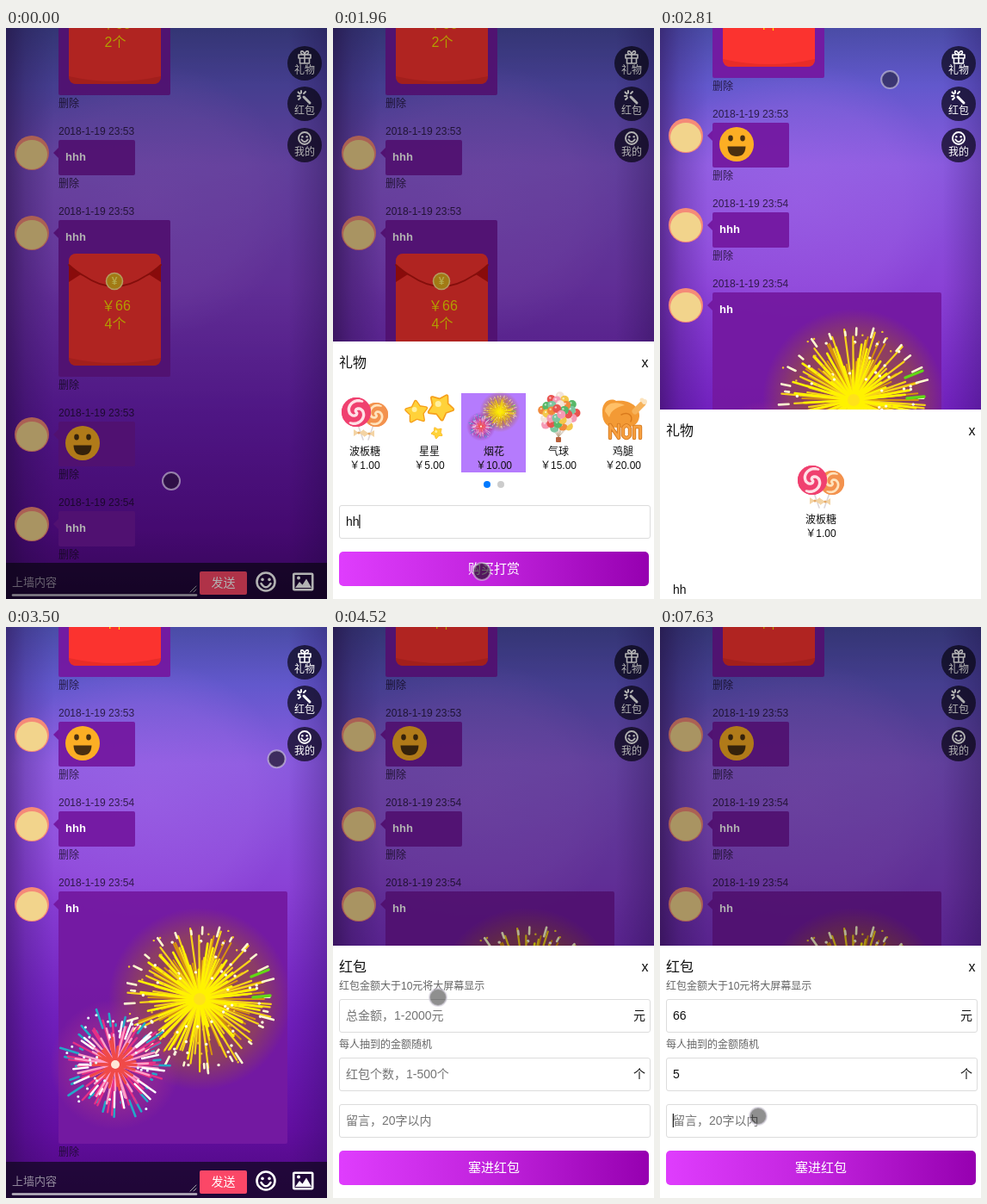
Animation, 373 px wide and 663 px high, one loop 8 s. Source, as an HTML page:

```html
<!DOCTYPE html>
<html lang="zh-CN">
<head>
<meta charset="utf-8">
<title>礼物与红包</title>
<style>
html, body { margin: 0; width: 100%; height: 100%; overflow: hidden; background: #4c087c; }
svg { display: block; width: 100vw; height: 100vh; }
text { font-family: "Liberation Sans", "Noto Sans CJK SC", "Noto Sans CJK", sans-serif; white-space: pre; }
</style>
</head>
<body>
<svg id="stage" viewBox="0 0 373 663" preserveAspectRatio="none"></svg>
<script>
const LOOP = 8000;
const DIGIT = 7.786; // advance of one 14px character

let seed = 7;
const rnd = () => {
  seed = (seed * 16807) % 2147483647;
  return seed / 2147483647;
};
const range = n => [...Array(n).keys()];
const polar = (x, y, r, a) => `${(x + r * Math.cos(a)).toFixed(1)} ${(y + r * Math.sin(a)).toFixed(1)}`;

// y is the vertical middle of the line
const label = (x, y, size, fill, str, extra = '') =>
  `<text x="${x}" y="${y + size * 0.36}" font-size="${size}" fill="${fill}" ${extra}>${str}</text>`;
const middle = 'text-anchor="middle"';
const circle = (x, y, r, fill, extra = '') => `<circle cx="${x}" cy="${y}" r="${r}" fill="${fill}" ${extra}/>`;
const rect = (x, y, w, h, fill, rx = 0, extra = '') =>
  `<rect x="${x}" y="${y}" width="${w}" height="${h}" rx="${rx}" fill="${fill}" ${extra}/>`;
const path = (d, fill, extra = '') => `<path d="${d}" fill="${fill}" ${extra}/>`;
const line = (d, color, width, extra = '') =>
  path(d, 'none', `stroke="${color}" stroke-width="${width}" stroke-linecap="round" stroke-linejoin="round" ${extra}`);
const group = (inner, x = 0, y = 0, extra = '') => `<g transform="translate(${x} ${y})" ${extra}>${inner}</g>`;

/* ---------- gifts, drawn in a 56px box ---------- */
function swirl(x, y, r, color, pale) {
  const arm = turn => range(24).map(i => (i ? 'L' : 'M') + polar(x, y, r * 0.86 * i / 23, turn + i * 0.2)).join('');
  return circle(x, y, r, color) + line(arm(0.6) + arm(0.6 + Math.PI), pale, r * 0.2) +
    circle(x, y, r - 0.8, 'none', `stroke="${color}" stroke-width="1.6"`);
}

function lollipop() {
  const bow = (x, y) => path(`M${x} ${y}l-6 -4v8zl6 -4v8z`, '#f3d3a4') + circle(x, y, 1.6, '#e6aa68');
  return line('M20 36L26 53M38 36L32 53', '#ddd6d8', 1.6) + swirl(41, 24, 14, '#f3924e', '#ffe3bd') +
    swirl(18, 21, 17, '#f0406f', '#ffe0e6') + bow(21, 45) + bow(33, 46);
}

function star(x, y, r, turn) {
  const d = range(10).map(i => (i ? 'L' : 'M') + polar(x, y, i % 2 ? r * 0.56 : r, turn + i * Math.PI / 5)).join('') + 'Z';
  return path(d, '#ffc52c', `stroke="#f6a01c" stroke-width="${r * 0.35}" stroke-linejoin="round"`) +
    path(d, '#ffd23a', 'stroke="#ffd23a" stroke-width="1.5" stroke-linejoin="round"') +
    circle(x - r * 0.2, y - r * 0.25, r * 0.25, '#fff0a0');
}
const stars = () => star(41, 15, 14, 0.2) + star(13, 21, 12, -0.4) + star(37, 45, 6, 0.5);

function balloons() {
  const colors = ['#e8534f', '#58b868', '#f4c84c', '#f59ab5', '#7cc6a0', '#f08a3c', '#f3e3d8'];
  const spots = range(30).map(i => {
    const r = 20.5 * Math.sqrt((30 - i) / 30), a = i * 2.4;
    return [28 + r * Math.cos(a), 22 + r * Math.sin(a)];
  });
  return line(spots.filter((p, i) => i % 3 == 0).map(([x, y]) => `M${x.toFixed(1)} ${y.toFixed(1)}L28 50`).join(''), '#b9a58a', 0.6) +
    spots.map(([x, y], i) => circle(x.toFixed(1), y.toFixed(1), 5, colors[i * 3 % 7]) +
      circle((x - 1.4).toFixed(1), (y - 1.6).toFixed(1), 1.2, '#fff', 'opacity=".6"')).join('') +
    rect(25, 50, 6, 6, '#b8603c', 1);
}

function roast() {
  const letters = 'M13 51V36L23 51V36M28 40Q32 33 36 40V48Q32 54 28 48ZM41 51V38H48V51';
  return path('M4 22C3 8 14 4 20 8C34 6 48 14 47 26C46 38 34 40 24 39C10 40 4 34 4 22Z', '#f39a35') +
    path('M7 20C8 10 20 8 30 13C22 15 14 18 12 27Z', '#ffc067') +
    line('M42 20L51 11', '#f6b25a', 7) + circle(53, 9, 3, '#fbe3bd') + circle(50, 7, 2.5, '#fbe3bd') +
    line('M26 24C34 20 40 25 37 32', '#d97a1c', 1.5) +
    line(letters, '#d0741c', 4.4) + line(letters, '#f7a040', 2.8);
}

// drawn in a 250px box; rays run from a share of r to a random share up to 1
function burst(x, y, r, n, from, color, width, least = 0.6) {
  const d = range(n).map(i => {
    const a = (i + rnd()) * 2 * Math.PI / n, far = r * (least + (1 - least) * rnd());
    return `M${polar(x, y, r * from, a)}L${polar(x, y, far, a)}`;
  }).join('');
  return line(d, color, width);
}
function sparks(x, y, r, n, color, size) {
  const d = range(n).map(() => `M${polar(x, y, r * (0.35 + 0.65 * rnd()), rnd() * 2 * Math.PI)}l.1 0`).join('');
  return line(d, color, size);
}
function fireworks() {
  const [x, y, u, v] = [156, 92, 58, 168];
  return circle(x, y, 106, 'url(#warm)') + circle(u, v, 76, 'url(#rosy)') +
    burst(x, y, 78, 60, 0.08, '#d8920c', 2, 0.5) + burst(x, y, 86, 56, 0.08, '#f6d21a', 2.2, 0.55) +
    burst(x, y, 74, 40, 0.05, '#fff200', 2.6, 0.4) + burst(x, y, 90, 30, 0.84, '#fffbd0', 2.6, 0.88) +
    sparks(x, y, 80, 46, '#fffbe0', 3.4) + sparks(x, y, 94, 30, '#f4c52a', 2.4) +
    line(`M${x + 60} ${y - 26}l20 -8M${x + 62} ${y - 2}l20 -2`, '#62d815', 3.4) + circle(x, y, 7, '#ffe21a') +
    burst(u, v, 68, 34, 0.66, '#24a8c8', 2.6) + burst(u, v, 60, 38, 0.3, '#e62f86', 2.4) +
    burst(u, v, 50, 30, 0.15, '#ff9fc8', 2.4) + burst(u, v, 58, 18, 0.55, '#ffffff', 2.4) +
    burst(u, v, 32, 26, 0.1, '#f04a48', 3) + sparks(u, v, 64, 30, '#e8fbff', 3) + circle(u, v, 5, '#ffe6d8');
}

const gifts = [
  ['波板糖', '1.00', lollipop()],
  ['星星', '5.00', stars()],
  ['烟花', '10.00', '<use href="#fireworks" transform="scale(.224)"/>'],
  ['气球', '15.00', balloons()],
  ['鸡腿', '20.00', roast()]
];
const gift = ([name, price, art], x) => group(art, x - 28, 425) +
  label(x, 492, 12, '#111', name, middle) + label(x, 508, 12, '#111', '￥' + price, middle);

/* ---------- chat ---------- */
function envelope(count) {
  return rect(0, 0, 107, 130, '#fb332f', 9) +
    path('M0 121Q53 133 107 121Q107 130 98 130H9Q0 130 0 121Z', '#e82c28') +
    path('M0 12L14 24L0 33ZM107 12L93 24L107 33Z', '#c41010') +
    path('M0 13Q10 22 18 26Q53 50 89 26Q97 22 107 13V9Q107 0 98 0H9Q0 0 0 9Z', '#fb332f') +
    line('M0 13Q10 22 18 26Q53 50 89 26Q97 22 107 13', '#bd1410', 1.8) +
    circle(53, 32, 9.5, '#e8ae1c', 'stroke="#ffe08a" stroke-width="1.6"') +
    label(53, 32, 12, '#fff06a', '¥', middle + ' font-weight="bold"') +
    label(55, 60, 16, '#ffe100', '￥66', middle) + label(54, 81, 16, '#ffe100', count + '个', middle);
}
const emoji = circle(28, 25, 20, '#fcae24') +
  '<ellipse cx="21" cy="18" rx="2.8" ry="3.4" fill="#4a3010"/><ellipse cx="35" cy="18" rx="2.8" ry="3.4" fill="#4a3010"/>' +
  path('M17.5 27.5H38.5Q38 39 28 39Q18 39 17.5 27.5Z', '#4a3010');

function message(top, w, h, minute, text, inner = '') {
  const ink = 'rgba(22,10,36,.78)';
  return label(61, top - 10, 12, ink, '2018-1-19 23:' + minute) +
    rect(61, top, w, h, '#7419a2', 2, 'opacity=".96"') + path(`M55 ${top + 15}l6 -6v12z`, '#7419a2') +
    circle(30, top + 15, 20, '#f58a78') + `<ellipse cx="30" cy="${top + 17}" rx="18" ry="17" fill="#f2d48c"/>` +
    label(69, top + 19, 13, '#fff', text, 'font-weight="bold"') +
    group(inner, 61, top) + label(61, top + h + 10, 12, ink, '删除');
}
const chat = message(-104, 130, 182, 53, 'hhh', group(envelope(2), 12, 39)) +
  message(130, 89, 41, 53, 'hhh') +
  message(223, 130, 182, 53, 'hhh', group(envelope(4), 12, 39)) +
  message(457, 89, 52, 53, '', emoji) +
  message(561, 89, 41, 54, 'hhh') +
  `<g id="newest">${message(654, 266, 293, 54, 'hh', group('<use href="#fireworks"/>', 8, 33))}</g>`;

const smiley = (x, y, r, w) => circle(x, y, r, 'none', `stroke="#fff" stroke-width="${w}"`) +
  circle(x - r * 0.38, y - r * 0.25, r * 0.17, '#fff') + circle(x + r * 0.38, y - r * 0.25, r * 0.17, '#fff') +
  line(`M${x - r * 0.52} ${y + r * 0.2}Q${x} ${y + r}  ${x + r * 0.52} ${y + r * 0.2}`, '#fff', w);

const tab = (y, name, icon) => circle(347, y, 20, 'rgba(12,8,26,.72)') + icon +
  label(347, y + 8, 12, '#fff', name, middle + ' font-weight="500"');
const tabs =
  tab(41, '礼物', line('M340 31H354V35H340ZM341.5 35V41H352.5V35M347 31V41M347 31Q341 30 343 27Q346 26 347 31Q348 26 351 27Q353 30 347 31', '#fff', 1.6)) +
  tab(88, '红包', line('M346 80L353 87', '#fff', 3) + line('M343 73V75.5M339 79H341.5M339.5 74.5L341.5 76.5M348 74L346 76M340 83L342 81', '#fff', 2)) +
  tab(136, '我的', smiley(347, 128, 7, 1.9));

const bar = rect(0, 621, 373, 42, 'rgba(14,6,28,.72)') +
  label(7, 643, 13, '#948b9e', '上墙内容') + line('M8 658.5H221', '#bdb8c4', 2.6) + line('M214 655L221 648M218 655L221 652', '#ccc', 0.8) +
  rect(225, 631, 55, 27, '#fb4767', 2) + label(252.5, 644, 14, '#fff', '发送', middle) + smiley(302, 643, 10.5, 2.6) +
  rect(334.2, 633.7, 22, 18.5, 'none', 1, 'stroke="#fff" stroke-width="2.6"') +
  path('M336 650L341 643L344.5 646.5L349 639.5L355 650Z', '#fff') + circle(340, 638.5, 2, '#fff');

/* ---------- panels ---------- */
const box = y => rect(7.5, y + 0.5, 361, 38, '#fff', 2.5, 'stroke="#dcdcdc"');
const entry = (id, y) => `<text id="${id}" x="15" y="${y + 5}" font-size="14"></text>`;
const button = name => rect(7, 608, 360, 40, 'url(#pink)', 5) + label(187, 628, 15, '#fff', name, middle);
const panel = (id, top, title, inner) => `<g id="${id}">${rect(0, top, 373, 700 - top, '#fff')}` +
  label(7, top + 24, 16, '#111', title) + label(358.5, top + 24, 16, '#111', 'x') + inner + '</g>';

const giftPanel = panel('giftPanel', 364, '礼物',
  `<g id="full">${rect(149, 424, 75, 92, '#b57bfd', 0, 'id="chosen"')}${gifts.map((g, i) => gift(g, 37 + 75 * i)).join('')}
  ${circle(179, 530, 4, '#007aff')}${circle(195, 530, 4, '#ccc')}${box(554)}</g>
  <g id="reset">${gift(gifts[0], 187)}</g>` + entry('wish', 573) + button('购买打赏'));

const packPanel = panel('packPanel', 370, '红包',
  label(7, 417, 12, '#666', '红包金额大于10元将大屏幕显示') + box(432) + label(349, 451, 14, '#111', '元') +
  label(7, 485, 12, '#666', '每人抽到的金额随机') + box(500) + label(349, 519, 14, '#111', '个') + box(554) +
  entry('total', 451) + entry('count', 519) + entry('note', 573) + button('塞进红包'));

const stop = (o, c, a = 1) => `<stop offset="${o}" stop-color="${c}" stop-opacity="${a}"/>`;
const radial = (id, c) => `<radialGradient id="${id}">${stop(0, c, 0.75)}${stop(0.7, c, 0.45)}${stop(1, c, 0)}</radialGradient>`;

document.getElementById('stage').innerHTML = `<defs>
  <linearGradient id="sky" x2="0" y2="1">${stop(0, '#4a4ca6')}${stop(0.1, '#6258cc')}${stop(0.24, '#8a5ade')}${stop(0.45, '#8a42d6')}
    ${stop(0.68, '#701fbc')}${stop(0.88, '#620ea0')}${stop(1, '#4c087c')}</linearGradient>
  <linearGradient id="sides">${stop(0, '#2a0a48', 0.5)}${stop(0.06, '#2a0a50', 0.22)}${stop(0.15, '#2a0a60', 0)}
    ${stop(0.88, '#2a0a60', 0)}${stop(1, '#200a50', 0.28)}</linearGradient>
  <linearGradient id="pink">${stop(0, '#df3dfd')}${stop(0.5, '#c022dc')}${stop(1, '#9600b0')}</linearGradient>
  ${radial('light', '#b070f0')}${radial('warm', '#a8641c')}${radial('rosy', '#a0308c')}
  <g id="fireworks">${fireworks()}</g></defs>
  ${rect(0, 0, 373, 663, 'url(#sky)')}
  <ellipse cx="165" cy="200" rx="170" ry="160" fill="url(#light)" opacity=".45"/>
  ${rect(0, 0, 373, 663, 'url(#sides)')}
  <g id="chat">${chat}</g>${tabs}${bar}
  ${rect(0, 0, 373, 663, '#000', 0, 'id="shade" opacity=".3"')}
  ${giftPanel}${packPanel}
  ${rect(0, 0, 1.1, 16, '#000', 0, 'id="caret"')}
  ${circle(0, 0, 10, '#101010', 'id="touch" stroke="#d2cdda" stroke-opacity=".6" stroke-width="2"')}`;

/* ---------- motion ---------- */
const $ = id => document.getElementById(id);
const show = (id, on) => $(id).setAttribute('visibility', on ? 'inherit' : 'hidden');
const clamp = v => Math.min(1, Math.max(0, v));

// cubic-bezier(.25, .1, .25, 1)
function ease(p) {
  if (p <= 0 || p >= 1) return clamp(p);
  let lo = 0, hi = 1, s = 0.5;
  for (let i = 0; i < 24; i++) {
    s = (lo + hi) / 2;
    const x = 0.75 * s * (1 - s) + s ** 3;
    if (x < p) lo = s; else hi = s;
  }
  return 0.3 * s * (1 - s) ** 2 + 3 * s * s * (1 - s) + s ** 3;
}
const slide = (t, start, length) => ease((t - start) / length);

const trail = [
  [0, 192, 526], [150, 192, 526], [570, 184, 472], [840, 184, 472], [1140, 187, 566], [1560, 187, 566],
  [1940, 173, 631], [2240, 173, 631], [2810, 267, 60], [3200, 347, 88], [3400, 347, 88], [4010, 151, 482],
  [4400, 125, 433], [4520, 122, 430], [5660, 122, 430], [6020, 125, 508], [6850, 125, 508], [7250, 120, 592],
  [7560, 114, 568], [LOOP, 114, 568]
];
function touchAt(t) {
  const i = trail.findIndex(k => k[0] > t);
  const [a, b] = [trail[i - 1], trail[i]];
  const p = (t - a[0]) / (b[0] - a[0]);
  return [a[1] + (b[1] - a[1]) * p, a[2] + (b[2] - a[2]) * p];
}
const presses = [[690, 840], [1290, 1430], [1940, 2240], [3380, 3510], [4830, 4950], [6300, 6430]];

// [field, line middle, placeholder, typed text by time, caret span]
const fields = [
  ['wish', 573, '请输入打赏上墙语，30字以内', [[1430, 'h'], [1560, 'hh']], 1290, 2240],
  ['total', 451, '总金额，1-2000元', [[5540, '6'], [5660, '66']], 4830, 6300],
  ['count', 519, '红包个数，1-500个', [[6730, '5']], 6300, 7560],
  ['note', 573, '留言，20字以内', [], 7560, LOOP]
];

function update(t) {
  const sent = t >= 2660;
  $('chat').setAttribute('transform', `translate(0 ${sent ? -347 : 0})`);
  show('newest', sent);
  show('shade', !sent || t >= 3640);
  show('full', !sent);
  show('reset', sent);
  $('chosen').setAttribute('visibility', t >= 840 && !sent ? 'visible' : 'hidden');

  const giftUp = slide(t, 130, 540) - slide(t, 2715, 515);
  const packUp = slide(t, 3775, 725);
  $('giftPanel').setAttribute('transform', `translate(0 ${Math.round(299 * (1 - giftUp))})`);
  $('packPanel').setAttribute('transform', `translate(0 ${Math.round(293 * (1 - packUp))})`);

  show('caret', false);
  for (const [id, y, hint, typed, from, to] of fields) {
    const now = typed.filter(k => k[0] <= t).pop();
    $(id).textContent = now ? now[1] : hint;
    $(id).setAttribute('fill', now ? '#111' : '#757575');
    if (t >= from && t < to) {
      const x = 14.8 + (now ? now[1].length * DIGIT : 0);
      $('caret').setAttribute('transform', `translate(${x} ${y - 8})`);
      show('caret', true);
    }
  }

  const [x, y] = touchAt(t);
  $('touch').setAttribute('transform', `translate(${x} ${y})`);
  $('touch').setAttribute('fill-opacity', presses.some(([a, b]) => t >= a && t < b) ? 0.62 : 0.47);
}

function tick() {
  update(performance.now() % LOOP);
  requestAnimationFrame(tick);
}
tick();
</script>
</body>
</html>
```
